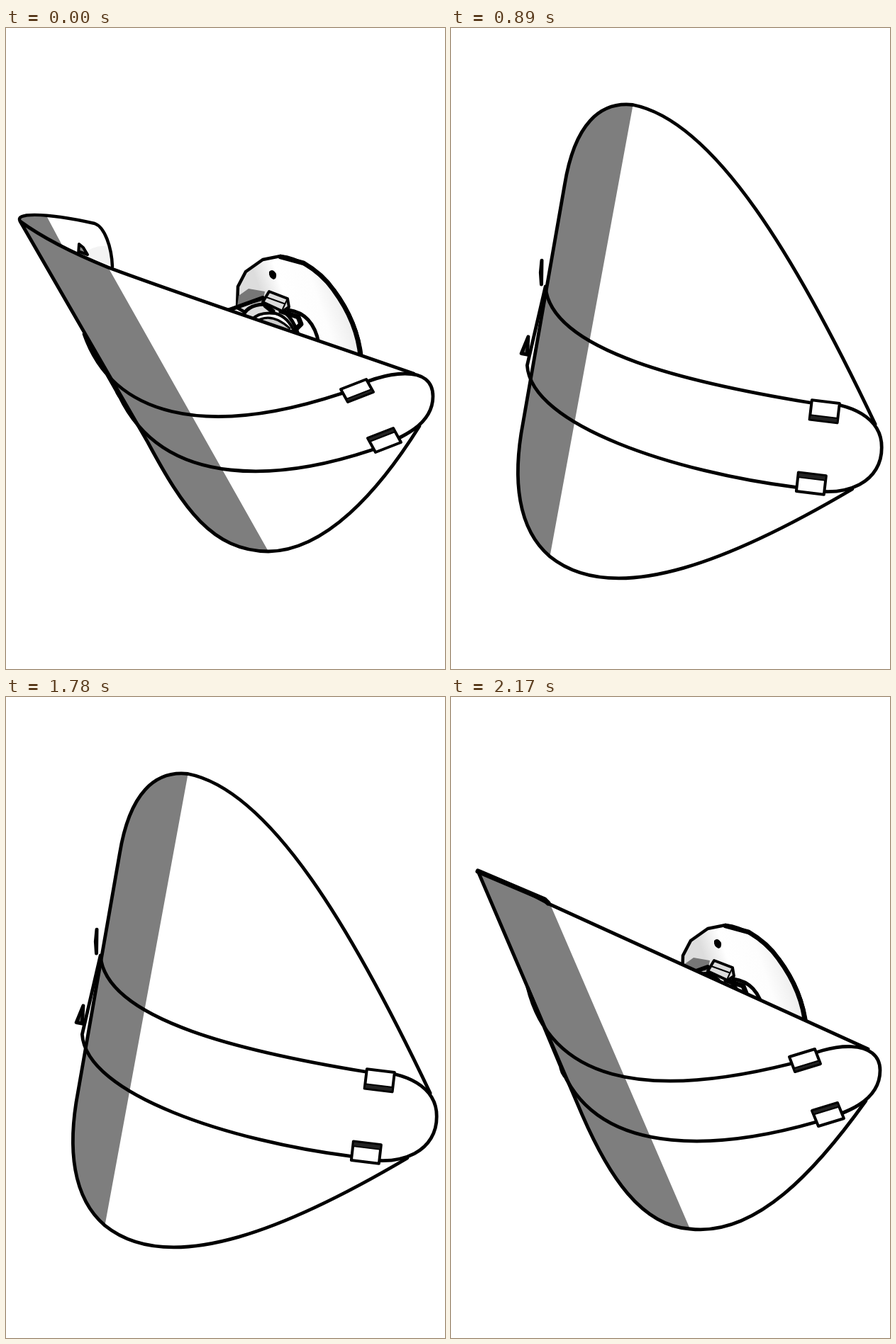
An HTML page with a canvas that plays this animation: 619 px wide and 905 px high, repeating every 2.3 s.

```html
<!DOCTYPE html>
<html lang="en">
<head>
<meta charset="utf-8">
<title>Tilting visor</title>
<style>
  html, body { margin: 0; width: 100%; height: 100%; overflow: hidden; background: #fff; }
  canvas { display: block; }
</style>
</head>
<body>
<canvas id="stage" width="619" height="905"></canvas>
<script>
const ctx = document.getElementById('stage').getContext('2d');

// Each pose lists points as x, y. "body" runs from the upper right joint over the
// top and down the left side to the lower right joint; "band" runs clockwise.
// "clips" holds three corners for each clip, "lugs" two small triangles.
const down = {
  body: [575,488, 420,434, 240,374, 144,338, 95,318, 50,295, 20,273,
         200,585, 250,678, 290,738, 370,739, 450,738, 525,655, 583,562],
  band: [110,432, 150,548, 280,580, 473,516, 540,480, 602,476, 602,520,
         602,560, 560,578, 515,596, 395,636, 225,656, 160,520],
  clips: [472,510, 508,496, 482,528, 510,579, 546,565, 521,599],
  lugs: [112,433, 114,437, 117,442, 156,510, 157,515, 160,520]
};
const lowered = {
  body: [588,497, 439,429, 289,361, 140,293, 90,265, 40,247, 38,246,
         185,590, 222,675, 268,747, 337,751, 430,762, 515,668, 585,570],
  band: [108,410, 140,540, 270,570, 478,518, 540,484, 605,484, 605,527,
         605,572, 555,588, 515,600, 390,636, 215,655, 158,530],
  clips: [477,508, 513,497, 485,529, 509,584, 545,573, 518,606],
  lugs: [110,410, 111,418, 114,425, 155,524, 157,530, 160,535]
};
const level = {
  body: [597,532, 455,360, 320,208, 198,150, 155,130, 124,138, 124,205,
         124,575, 124,660, 148,732, 198,764, 300,828, 455,725, 576,622],
  band: [123,370, 128,498, 330,526, 498,521, 560,508, 610,525, 610,567,
         610,608, 570,640, 498,633, 330,640, 124,600, 121,480],
  clips: [498,514, 538,512, 499,542, 498,612, 538,610, 500,639],
  lugs: [121,324, 114,345, 122,360, 120,436, 114,458, 121,460]
};
const raised = {
  body: [597,593, 540,300, 450,55, 335,87, 280,104, 230,168, 192,262,
         85,530, 55,608, 45,672, 88,712, 165,790, 345,760, 552,682],
  band: [145,370, 165,405, 350,478, 518,542, 567,552, 602,582, 601,621,
         602,674, 548,698, 472,663, 320,605, 125,517, 97,487],
  clips: [520,542, 556,555, 512,566, 480,644, 516,657, 471,668],
  lugs: [136,364, 146,370, 134,387, 102,465, 89,486, 98,488]
};
const up = {
  body: [596,612, 580,330, 540,55, 398,91, 340,104, 270,185, 205,298,
         75,517, 35,588, 29,640, 69,672, 140,740, 320,748, 550,692],
  band: [150,375, 210,368, 390,475, 528,553, 568,573, 597,600, 597,635,
         598,692, 545,712, 463,662, 340,592, 150,476, 88,487],
  clips: [530,549, 563,571, 517,572, 476,645, 508,663, 462,667],
  lugs: [143,372, 153,374, 139,398, 98,469, 81,486, 91,490]
};

// Quadratic in-between, half a step from the middle pose towards "near".
const between = (near, middle, far) => Object.fromEntries(Object.keys(middle).map(part =>
  [part, middle[part].map((v, i) => (3 * near[part][i] + 6 * v - far[part][i]) / 8)]));

const poses = [down, lowered, between(lowered, level, raised), level,
               between(raised, level, lowered), raised, up];

function polygon(...p) {
  const path = new Path2D();
  for (let i = 0; i < p.length; i += 2) path.lineTo(p[i], p[i + 1]);
  path.closePath();
  return path;
}

function curves(path, p) {
  for (let i = 0; i < p.length; i += 6) path.bezierCurveTo(...p.slice(i, i + 6));
  return path;
}

function startAt(x, y) {
  const path = new Path2D();
  path.moveTo(x, y);
  return path;
}

function paint(path, fill, width, stroke = '#000') {
  if (fill) { ctx.fillStyle = fill; ctx.fill(path); }
  if (width) { ctx.lineWidth = width; ctx.strokeStyle = stroke; ctx.stroke(path); }
}

const svg = (d, fill, width, stroke) => paint(new Path2D(d), fill, width, stroke);

const discShade = ctx.createLinearGradient(365, 390, 480, 350);
[[0, '#ddd'], [.25, '#fff'], [.6, '#fdfdfd'], [1, '#e6e6e6']]
  .forEach(([at, color]) => discShade.addColorStop(at, color));

function drawHeadgear() {
  svg('M326 395L327 365L338 344L362 327L387 322Q424 326 460 367Q497 414 502 468L440 460Z', discShade, 4.5);
  svg('M387 323L420 332Q446 347 462 370Q496 416 500 466', null, 6.5);
  svg('M328 378L342 368L365 372L362 386L326 394Z', '#777');
  svg('M371 344Q376 339 381 347Q382 354 377 355Q370 352 371 344Z', '#000');
  svg('M398 398Q433 403 441 445', '#fff', 5);
  svg('M312 399L362 381', null, 6);
  svg('M333 410Q338 391 364 390Q398 391 412 432', '#ddd', 5);
  svg('M346 412Q357 400 380 403Q398 408 407 430', '#fff', 4);
  svg('M350 416Q373 399 400 424', '#ccc', 3);
  svg('M366 392L376 400M388 400L412 408L416 418L408 426', null, 7);
  svg('M371 372L397 382L399 394L390 400L362 387Z', '#ddd', 4);
  svg('M397 382L390 397M367 380L392 389', null, 2);
}

function drawInnerLip() {
  const lip = 'M20 273Q14 264 40 264Q72 264 125 276C139 281 149 309 150 337L144 338Z';
  svg(lip, '#fff');
  svg('M20 272Q15 264 58 267L82 312L45 294Z', '#7e7e7e');
  svg('M108 320Q127 304 145 309L149 336Z', '#f3f3f3');
  svg('M102 319L103 305L109 310L115 320L104 316', '#888', 4);
  svg('M20 273Q14 264 40 264Q72 264 125 276C139 281 149 309 150 337', null, 4.5);
}

function drawClip([x, y, rx, ry, bx, by], darkFrom, darkTo) {
  const dx = rx - x, dy = ry - y, ex = bx - x, ey = by - y;
  const slab = (from, to) => polygon(
    x + ex * from, y + ey * from, rx + ex * from, ry + ey * from,
    rx + ex * to, ry + ey * to, x + ex * to, y + ey * to);
  paint(slab(0, 1), '#fff', 4);
  paint(slab(darkFrom, darkTo), '#222', 2);
}

function drawVisor({ body, band, clips, lugs }) {
  paint(polygon(...lugs.slice(0, 6)), '#555', 5);
  paint(polygon(...lugs.slice(6)), '#555', 5);

  const outline = curves(startAt(body[0], body[1]), body.slice(2, 14));
  outline.lineTo(body[14], body[15]);
  curves(outline, body.slice(16));

  const strap = curves(startAt(band[0], band[1]), band.slice(2));
  strap.closePath();

  const shade = curves(startAt(body[6], body[7]), body.slice(8, 14));
  shade.lineTo(body[14], body[15]);
  curves(shade, body.slice(16, 22));

  paint(outline, '#fff');
  paint(strap, '#fff');
  paint(shade, '#7e7e7e');
  paint(outline, null, 4.8);
  paint(strap, null, 4.8);
  drawClip(clips.slice(0, 6), .77, 1);
  drawClip(clips.slice(6), 0, .25);
}

function stepAt(ms) {
  if (ms < 500) return 0;
  if (ms < 1150) return 1 + Math.floor((ms - 500) / 130);
  if (ms < 1650) return 6;
  return 5 - Math.floor((ms - 1650) / 130);
}

function draw() {
  const step = stepAt(performance.now() % 2300);
  ctx.fillStyle = '#fff';
  ctx.fillRect(0, 0, 619, 905);
  ctx.lineJoin = ctx.lineCap = 'round';
  drawHeadgear();
  if (step === 0) drawInnerLip();
  drawVisor(poses[step]);
  if (step === 1) svg('M38 246L132 286L137 291', null, 7);
  requestAnimationFrame(draw);
}
draw();
</script>
</body>
</html>
```
